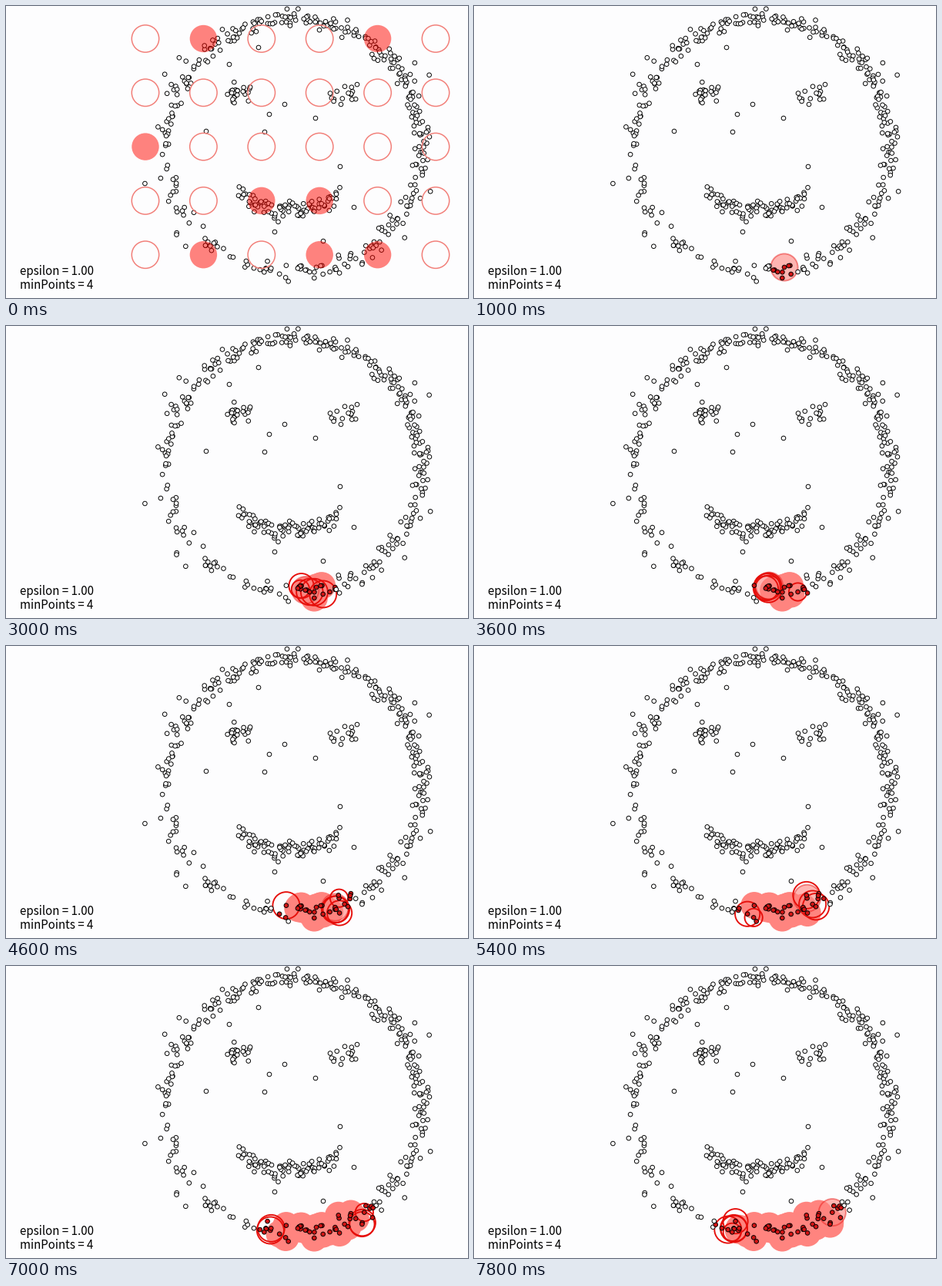
A matplotlib script for the animation above (8 s loop, 600 px wide and 380 px high).

```python
import numpy as np
import matplotlib.pyplot as plt
from matplotlib.animation import FuncAnimation
from matplotlib.patches import Circle

W, H, DPI = 600, 380, 100
FRAMES, STEP = 40, 200
EPS, MIN_POINTS = 17.6, 4
SEED_POINT = (403, 340)
PX = 72 / DPI
PINK, RED, DARK = "#ff847f", "#e60f0b", "#d21414"
rng = np.random.default_rng(12)


def spread(density, lo, hi, jitter=2.5):
    """Positions from lo to hi that follow a density, with some clumping."""
    t = np.linspace(lo, hi, 2000)
    total = np.cumsum(density(t)) * (t[1] - t[0])
    n = int(total[-1])
    return np.interp(np.arange(n) + rng.uniform(-jitter, jitter, n), total, t)


def ring_density(deg):
    base = 1 + 0.35 * np.cos(np.radians(deg - 310))
    for gap in (15, 30, 110, 122, 140, 154, 168, 178, 221, 303):
        base = base * (1 - 0.95 * np.exp(-((deg - gap) / 2) ** 2))
    return base


def ring(deg, offset):
    a = np.radians(deg)
    r = 166 + 4 * np.cos(a - np.radians(340)) + offset
    return np.column_stack([370 + r * np.cos(a), 183 + r * np.sin(a)])


def noise(n, sigma):
    return np.clip(rng.normal(0, sigma, n), -2 * sigma, 2 * sigma)


def face():
    deg = spread(ring_density, 0, 360)
    x = spread(lambda t: 0.64 + 0 * t, 302, 434)
    mouth = np.column_stack(
        [x, 268 - 24 * ((x - 368) / 65) ** 2 + noise(len(x), 7)])
    eyes = [np.column_stack([cx + noise(n, 4), cy + noise(n, 7)])
            for cx, cy, n in ((295, 112, 17), (311, 113, 8),
                              (429, 110, 6), (448, 111, 9))]
    inner = [(328, 54), (290, 76), (362, 128), (342, 141), (435, 128),
             (402, 146), (260, 163), (336, 164), (434, 209), (452, 262),
             (349, 294), (412, 306)]
    strays = ring(rng.uniform(130, 400, 11), rng.uniform(20, 34, 11))
    return np.vstack([ring(deg, noise(len(deg), 6)), mouth, *eyes,
                      inner, strays])


def start_frame(i):
    return 1 if i == 0 else int(8 + 0.8 * (i - 1))


def grow_cluster(points):
    """Breadth-first visit: point order, core flags, frame of discovery."""
    gap = np.hypot(*(points[:, None] - points).transpose(2, 0, 1))
    near = gap <= EPS
    core = near.sum(axis=1) >= MIN_POINTS
    found = np.full(len(points), FRAMES)
    queue = [0]
    found[0] = start_frame(0)
    for i, p in enumerate(queue):
        if start_frame(i) >= FRAMES:
            return queue[:i], core, found
        if core[p]:
            fresh = np.flatnonzero(near[p] & (found == FRAMES))
            found[fresh] = start_frame(i)
            queue.extend(fresh)
    return queue, core, found


points = np.vstack([[SEED_POINT], rng.permutation(face())])
queue, core, found = grow_cluster(points)

fig = plt.figure(figsize=(W / DPI, H / DPI), dpi=DPI, facecolor="#fdfdfe")
ax = fig.add_axes([0, 0, 1, 1])
ax.set_xlim(0, W)
ax.set_ylim(H, 0)
ax.axis("off")

for y, label in ((350, "epsilon = 1.00"), (368, "minPoints = 4")):
    ax.text(18, y, label, family="Noto Sans CJK JP", size=15.1 * PX,
            color="black", va="baseline")

dots = ax.scatter(*points.T, s=(5.6 * PX) ** 2, linewidths=0.95 * PX,
                  edgecolors="black", facecolors="white", zorder=4)

# sample balls shown before the run; '#' marks a dense one
SAMPLES = (".#..#.", "......", "#.....", "..##..", ".#.##.")
grid = []
for row, line in enumerate(SAMPLES):
    for col, mark in enumerate(line):
        dense = mark == "#"
        grid.append(ax.add_patch(Circle(
            (181 + 75.4 * col, 42.5 + 70.3 * row), 17.7,
            facecolor=(1, 0.03, 0, 0.5) if dense else "none",
            edgecolor="none" if dense else "#f27f79",
            linewidth=1.5 * PX, zorder=5)))

balls = [ax.add_patch(Circle(points[p], EPS, visible=False)) for p in queue]


def style_ball(ball, age, is_core):
    ball.set_visible(age >= 0 and (is_core or age < 4))
    ball.set_radius(EPS * (1 - 0.34 * 0.25 ** max(age, 0)))
    ball.set_linewidth(1.9 * PX if age < 5 else 0)
    ball.set_zorder(3 if age < 5 else 2)
    if age < 4:
        ball.set_facecolor("none")
        ball.set_edgecolor(RED)
    elif age == 4:
        ball.set_facecolor((1, 0.52, 0.5, 0.6))
        ball.set_edgecolor((0.91, 0.06, 0.05, 0.45))
    else:
        ball.set_facecolor(PINK)
        ball.set_edgecolor("none")


def update(frame):
    for g in grid:
        g.set_visible(frame == 0)
    for i, ball in enumerate(balls):
        style_ball(ball, frame - start_frame(i), core[queue[i]])
    dots.set_facecolors([DARK if f <= frame else "white" for f in found])
    return [dots, *grid, *balls]


anim = FuncAnimation(fig, update, frames=FRAMES, interval=STEP,
                     repeat=True, repeat_delay=0, blit=False)
plt.show()
```
